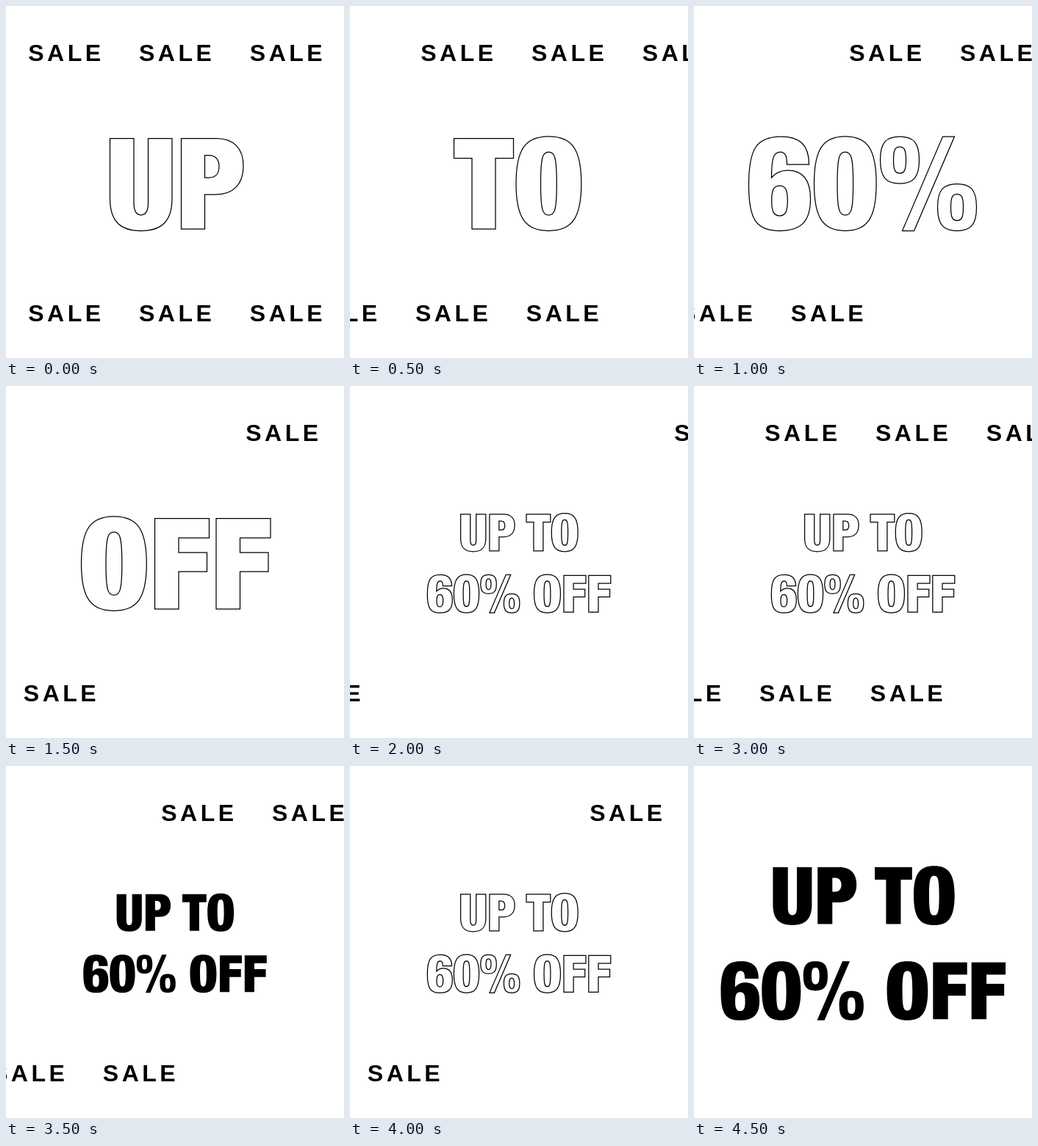
An HTML page for the animation above (5 s loop, 460 by 480 pixels).

```html
<!DOCTYPE html>
<html lang="en">
<head>
<meta charset="utf-8">
<title>Sale</title>
<style>
  html, body { margin: 0; width: 100%; height: 100%; overflow: hidden; background: #fff; }
  svg { display: block; width: 460px; height: 480px; }
  text { font: bold 32px "Liberation Sans", Arial, sans-serif; letter-spacing: 4.5px; }
  .line path { fill: none; stroke: #000; stroke-width: 1.25; vector-effect: non-scaling-stroke; }
</style>
</head>
<body>
<svg id="stage" viewBox="0 0 460 480"></svg>
<script>
const NS = 'http://www.w3.org/2000/svg';
const STEP = 500, LOOP = 5000;
const stage = document.getElementById('stage');

function add(parent, tag, attrs = {}) {
  const el = document.createElementNS(NS, tag);
  for (const name in attrs) el.setAttribute(name, attrs[name]);
  return parent.appendChild(el);
}

// Closed oval; kx and ky set how square its shoulders are.
function oval(cx, cy, rx, ry, kx = 0.68, ky = 0.76) {
  const l = cx - rx, r = cx + rx, t = cy - ry, b = cy + ry;
  const dx = rx * kx, dy = ry * ky;
  return `M${cx} ${t}C${cx + dx} ${t} ${r} ${cy - dy} ${r} ${cy}` +
    `S${cx + dx} ${b} ${cx} ${b}S${l} ${cy + dy} ${l} ${cy}S${cx - dx} ${t} ${cx} ${t}Z`;
}

// Condensed black letters, baseline at 0, cap height 123.5.
const glyphs = {
  U: 'M0-123.5H32.5V-36C32.5-24 36-19 42.2-19S52-24 52-36V-123.5H84.5V-42C84.5-12 72 2.5 42.2 2.5S0-12 0-42Z',
  P: 'M0-123.5H48C72-123.5 84.5-109 84.5-86C84.5-61 71-47 47-47H32V0H0Z' +
     'M32-100.5V-70H38C47-70 51.5-76 51.5-85S47-100.5 38-100.5Z',
  T: 'M0-123.5H81V-96.5H56.5V0H24.5V-96.5H0Z',
  O: oval(44.4, -61.8, 44.4, 64.3) + oval(44.4, -61.8, 10.9, 43, 0.7, 0.88),
  F: 'M0-123.5H74V-97H32.5V-77H71V-51H32.5V0H0Z',
  6: 'M82-88H52C52-99 50-105 43-105C34-105 31-97 31-70C36-76 43-80 53-80C74-80 84-66 84-41' +
     'C84-10 71 2.5 42 2.5C10 2.5 0-13 0-60C0-110 11-126 44-126C70-126 82-114 82-88Z' +
     oval(42, -38.5, 10.8, 20.5, 0.7, 0.76),
  0: oval(42.3, -61.8, 42.3, 64.3) + oval(42.3, -61.8, 10.8, 43, 0.7, 0.88),
  '%': oval(26.5, -94, 26.5, 32) + oval(26.5, -94, 8.5, 18, 0.7, 0.8) +
     oval(104.5, -29.5, 26.5, 32) + oval(104.5, -29.5, 8.5, 18, 0.7, 0.8) +
     'M85-126H101L46 2.5H30Z'
};
const offsets = { UP: [0, 97], TO: [0, 84.5], '60%': [0, 89, 179], OFF: [0, 100, 183.5] };

function word(parent, text, x, y, scale = 1) {
  const g = add(parent, 'g', {
    transform: `translate(${x} ${y}) scale(${scale})`, role: 'img', 'aria-label': text
  });
  [...text].forEach((ch, i) => add(g, 'path', {
    d: glyphs[ch], 'fill-rule': 'evenodd', transform: `translate(${offsets[text][i]} 0)`
  }));
}

// Each entry is [text, x, baseline, scale].
function scene(style, ...words) {
  const g = add(stage, 'g', { class: style, visibility: 'hidden' });
  words.forEach(w => word(g, ...w));
  return g;
}

const small = [['UP', 150.6, 224.8, 0.405], ['TO', 240, 224.8, 0.405],
               ['60%', 105.3, 308.3, 0.405], ['OFF', 250.5, 308.3, 0.405]];
const large = [['UP', 107.4, 215.4, 0.627], ['TO', 246, 215.4, 0.627],
               ['60%', 36.5, 345.3, 0.627], ['OFF', 262.6, 345.3, 0.627]];

const up = scene('line', ['UP', 141.5, 304]);
const to = scene('line', ['TO', 141.5, 304]);
const sixty = scene('line', ['60%', 74.5, 304]);
const off = scene('line', ['OFF', 102.5, 304]);
const outline = scene('line', ...small);
const solid = scene('solid', ...small);
const finale = scene('solid', ...large);
const order = [up, to, sixty, off, outline, solid, outline, solid, outline, finale];

function saleRow(y) {
  const g = add(stage, 'g');
  for (let i = 0; i < 3; i++) {
    add(g, 'text', { x: 30.2 + 150.8 * i, y }).textContent = 'SALE';
  }
  return g;
}
const topRow = saleRow(75.2), bottomRow = saleRow(429.8);

function place(row, x, shown) {
  row.setAttribute('transform', `translate(${x} 0)`);
  row.setAttribute('visibility', shown ? 'visible' : 'hidden');
}

// Both rows jump in even steps, after a shorter first one.
function draw(time) {
  const n = Math.floor(time % LOOP / STEP);
  const k = n % 5;
  order.forEach(s => s.setAttribute('visibility', s === order[n] ? 'visible' : 'hidden'));
  place(topRow, k ? 115 * k - 49 : 0, n < 9);
  place(bottomRow, k ? 16 - 108 * k : 0, n < 9);
}

const start = performance.now();
function tick() {
  draw(performance.now() - start);
  requestAnimationFrame(tick);
}
tick();
</script>
</body>
</html>
```
